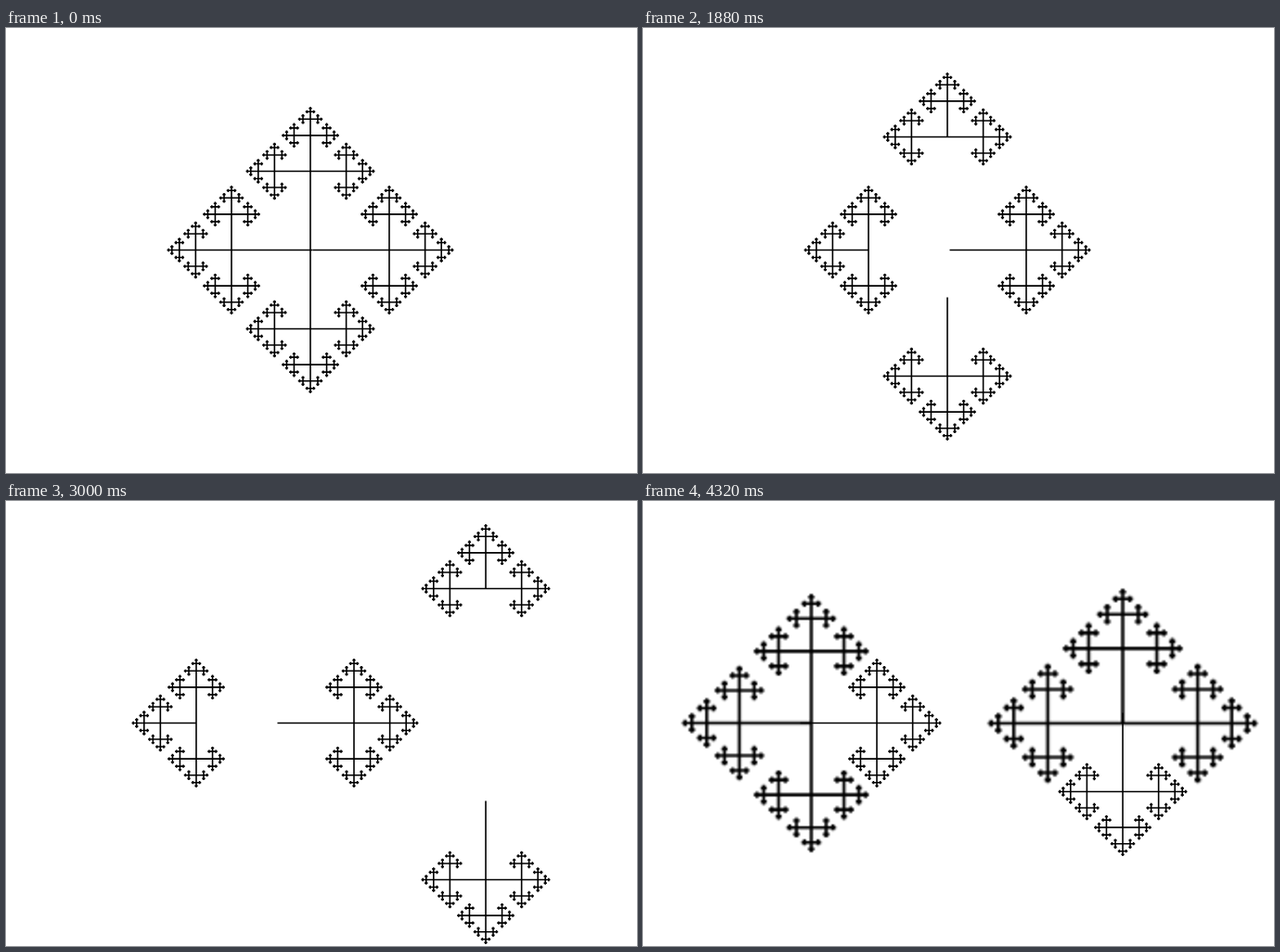
Write an HTML page with a canvas that moves like this. It is 680 by 480 pixels and loops after 6320 ms.

```html
<!DOCTYPE html>
<html lang="en">
<head>
<meta charset="utf-8">
<title>Free group decomposition</title>
<style>
  html, body { margin: 0; width: 100%; height: 100%; overflow: hidden; background: #fff; }
  canvas { display: block; }
</style>
</head>
<body>
<canvas id="stage" width="680" height="480"></canvas>
<script>
const LOOP = 6320, W = 680, H = 480;
const CX = 328, CY = 239.5, ARM = 85, RATIO = 5 / 11, DEPTH = 6;
const ctx = document.getElementById('stage').getContext('2d');
ctx.imageSmoothingQuality = 'high';

function layer(draw) {
  const canvas = document.createElement('canvas');
  canvas.width = W;
  canvas.height = H;
  const c = canvas.getContext('2d');
  c.lineWidth = 1.6;
  c.beginPath();
  draw(c);
  c.stroke();
  return canvas;
}

function line(c, x1, y1, x2, y2) {
  c.moveTo(x1, y1);
  c.lineTo(x2, y2);
}

// Branches leaving a node in every direction except back.
function grow(c, x, y, dx, dy, len, depth) {
  if (!depth) return;
  for (const [u, v] of [[dx, dy], [dy, -dx], [-dy, dx]]) {
    const nx = x + u * len, ny = y + v * len;
    line(c, x, y, nx, ny);
    grow(c, nx, ny, u, v, len * RATIO, depth - 1);
  }
}

// gap: where the stem starts, measured from the centre
const quarter = (dx, dy, gap) => layer(c => {
  const x = CX + dx * ARM, y = CY + dy * ARM;
  line(c, CX + dx * gap, CY + dy * gap, x, y);
  grow(c, x, y, dx, dy, ARM * RATIO, DEPTH - 1);
});

const up = quarter(0, -1, ARM);
const left = quarter(-1, 0, ARM);
const down = quarter(0, 1, 0);
const right = quarter(1, 0, 2.5);
const hub = layer(c => {
  line(c, CX, CY - ARM, CX, CY);
  line(c, CX - ARM, CY, CX + 2.5, CY);
});

// Stepped linear progress, 0 to 1.
function progress(t, start, steps, stepMs) {
  const n = Math.floor((t - start) / stepMs) + 1;
  return Math.min(Math.max(n / steps, 0), 1);
}

// Moves a layer by whole pixels and scales it around (ax, ay).
function place(img, dx, dy, scale = 1, ax = 0, ay = 0) {
  ctx.drawImage(img,
    ax * (1 - scale) + Math.round(dx), ay * (1 - scale) + Math.round(dy),
    W * scale, H * scale);
}

function render(t) {
  const spread = progress(t, 1520, 31, 20);
  const shift = 189 * progress(t, 2140, 38, 20);
  const slide = -133 * progress(t, 2900, 21, 20);
  const size = progress(t, 3320, 20, 30);
  const join = progress(t, 3920, 21, 20);

  ctx.fillStyle = '#fff';
  ctx.fillRect(0, 0, W, H);
  if (t < 1000) place(hub, 0, 0);
  place(left, slide, 0, 1 + 1.005 * size, 172, CY);
  place(right, slide - 28 * join, 0);
  place(up, shift, -60 * spread + 69 * join, 1 + 1.09 * size, CX, 84.5);
  place(down, shift, 84 * spread - 95 * join);
}

function frame() {
  render(performance.now() % LOOP);
  requestAnimationFrame(frame);
}
frame();
</script>
</body>
</html>
```
